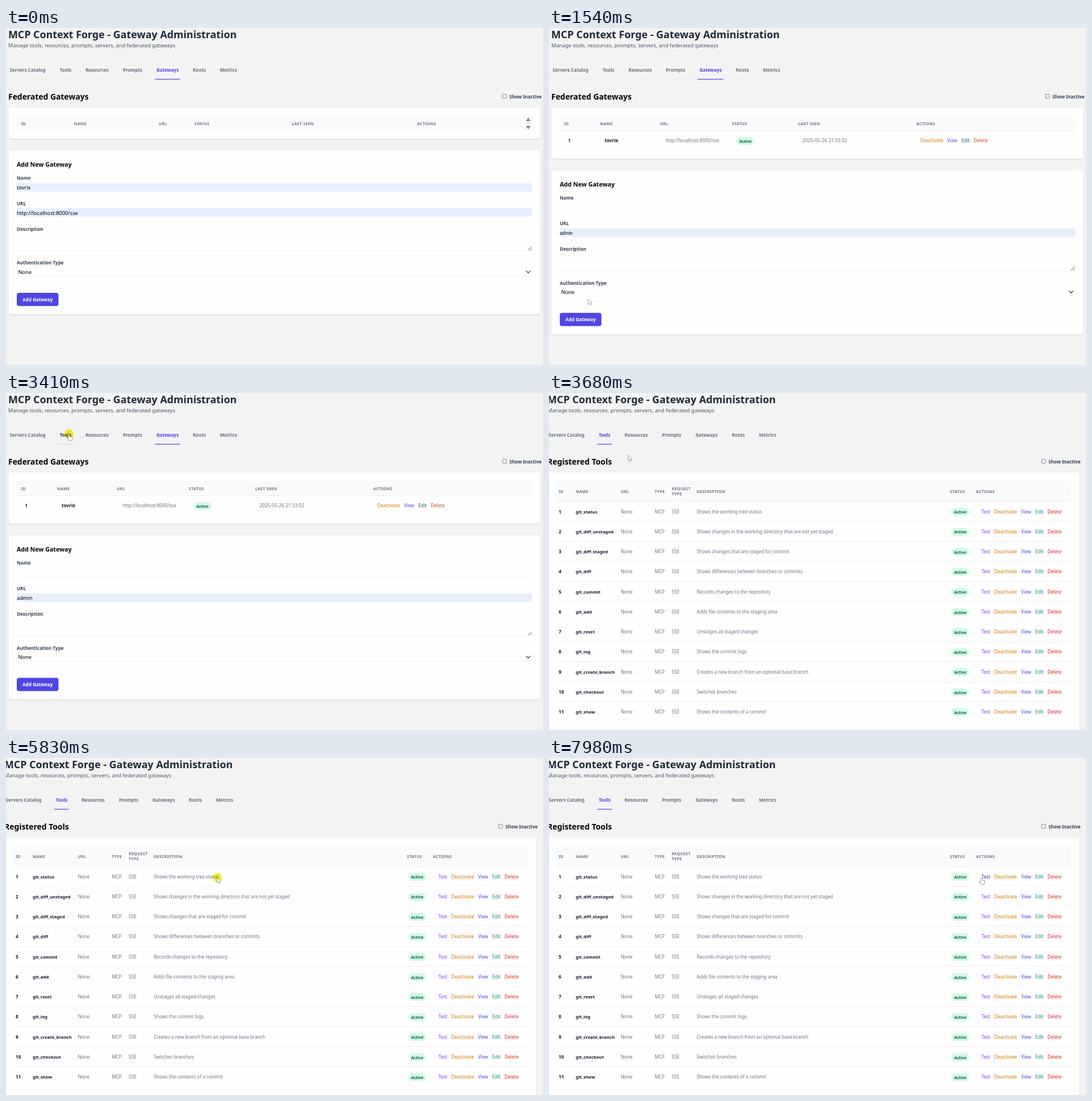
Animation of 945x593 px, one loop 8 s. Source, as an HTML page with a canvas:

```html
<!DOCTYPE html>
<html lang="en">
<head>
<meta charset="utf-8">
<title>Gateway Administration</title>
<style>
html, body { margin: 0; width: 100%; height: 100%; overflow: hidden; background: #f3f3f4; }
canvas { display: block; width: 945px; height: 593px; }
</style>
</head>
<body>
<canvas id="c" width="945" height="593"></canvas>
<script>
const g = document.getElementById('c').getContext('2d');
const LOOP = 8000, PRESS = 880, RELOAD = 1150, TOOLS = 3500, ROW = 35.27;
const INDIGO = '#4f46e5', GRAY = '#6b7280', DARK = '#374151', INK = '#111827', LINE = '#ececef', FILL = '#e7effd';
const XS = 6.95, SM = 8.1, MD = 9.24, NAME = 7.76;

// Draws text and returns the x where it ends
function text(s, x, y, size, color, weight = 400, gap = 0, family = '"Noto Sans"') {
  g.font = `${weight} ${size}px ${family}, sans-serif`;
  g.letterSpacing = gap + 'px';
  g.fillStyle = color;
  g.fillText(s, x, y);
  return x + g.measureText(s).width;
}
function rect(x, y, w, h, color) {
  g.fillStyle = color;
  g.fillRect(x, y, w, h);
}
function round(x, y, w, h, r, color) {
  g.fillStyle = color;
  g.beginPath();
  g.roundRect(x, y, w, h, r);
  g.fill();
}
function stroke(points, color, width) {
  g.strokeStyle = color;
  g.lineWidth = width;
  g.beginPath();
  points.forEach(([x, y]) => g.lineTo(x, y));
  g.stroke();
}
function shape(points) {
  stroke([...points, points[0]], '#444', 1);
  g.fillStyle = '#fff';
  g.fill();
}
function card(y, h) {
  g.save();
  g.shadowColor = 'rgba(0,0,0,.16)';
  g.shadowBlur = 2;
  g.shadowOffsetY = 0.8;
  round(4.5, y, 936, h, 5, '#fefefe');
  g.restore();
}
const head = (s, x, y) => text(s, x, y, XS, GRAY, 600, 0.33);
const label = (s, y) => text(s, 19, y, SM, DARK, 600);
const rule = y => rect(19, y, 907, 0.8, LINE);
const field = y => round(19, y, 907, 15, 3, FILL);

function badge(x, y) {
  round(x, y, 31, 13.5, 6.7, '#d1fae5');
  text('Active', x + 5, y + 9.8, XS, '#065f46', 600);
}
function actions(x, y, colors) {
  for (const [name, color] of Object.entries(colors)) x = text(name, x, y, SM, color) + 7.2;
}

function header(tab, title, hover) {
  text('MCP Context Forge - Gateway Administration', 4, 18.4, 17.87, '#1f2937', 700);
  text('Manage tools, resources, prompts, servers, and federated gateways', 4, 33.6, MD, '#4b5563');
  rect(4, 90, 937, 0.8, LINE);
  let x = 6.5;
  for (const name of ['Servers Catalog', 'Tools', 'Resources', 'Prompts', 'Gateways', 'Roots', 'Metrics']) {
    const on = name === tab, over = name === hover;
    const end = text(name, x, 76.8, SM, on ? INDIGO : over ? DARK : GRAY, 600);
    if (on || over) rect(x - 2.5, 89.6, end - x + 5, 1.2, on ? INDIGO : '#d1d5db');
    x = end + 24.8;
  }
  text(title, 4, 126.2, 13.9, '#000', 700);
  g.strokeStyle = '#767676';
  g.lineWidth = 0.9;
  g.beginPath();
  g.roundRect(873.8, 116.6, 7, 7, 1.2);
  g.stroke();
  text('Show Inactive', 886, 123.6, SM, DARK, 600);
}

function gateways(t) {
  const added = t >= RELOAD, dy = added ? ROW : 0;
  header('Gateways', 'Federated Gateways', overTab(t) && 'Tools');
  card(140, 55 + dy);
  rect(19, 154.5, 907, 26, '#f9fafb');
  const xs = added ? [26.5, 90, 195, 322, 438.5, 646.5] : [26.5, 119.5, 269, 331.5, 503, 723.5];
  ['ID', 'NAME', 'URL', 'STATUS', 'LAST SEEN', 'ACTIONS'].forEach((s, i) => head(s, xs[i], 170.5));
  if (added) {
    const y = 201.2;
    rule(180.3);
    text('1', 33.5, y, SM, INK, 600);
    text('tovrix', 98, y, SM, INK, 600);
    text('http://localhost:8000/sse', 205, y, SM, GRAY);
    badge(330, 192.3);
    text('2025-05-26 21:33:02', 446, y, SM, GRAY, 400, 0.13);
    actions(653.5, y, { Deactivate: '#d97706', View: INDIGO, Edit: '#155e75', Delete: '#cf4a1e' });
  } else {
    g.fillStyle = '#85858c';
    for (const side of [-1, 1]) {
      const y = 168 + side * 4.2;
      g.beginPath();
      g.moveTo(914.8, y);
      g.lineTo(923.2, y);
      g.lineTo(919, y + side * 6);
      g.fill();
    }
    rect(915, 167.3, 8, 0.9, '#c4c4ca');
  }
  g.save();
  g.translate(0, dy);
  form(t, added);
  g.restore();
}

function form(t, added) {
  card(215, 289);
  text('Add New Gateway', 19, 243.7, 10.65, '#000', 700);
  label('Name', 267.2);
  label('URL', 311.8);
  label('Description', 356.8);
  label('Authentication Type', 416.3);
  field(317.3);
  if (added) {
    rule(287.3);
    // The suggested value takes the page font after the first click
    if (t < 3340) text('admin', 19, 328.6, 8.3, '#000', 400, 0, '"Liberation Sans"');
    else text('admin', 19, 328.6, MD, '#000');
  } else {
    field(272.8);
    text('tovrix', 19, 284, MD, '#000');
    text('http://localhost:8000/sse', 19, 328.6, MD, '#000');
  }
  rule(392);
  for (const d of [6.5, 3]) stroke([[925 - d, 391], [925, 391 - d]], '#444', 0.9);
  text('None', 21.5, 433, MD, '#000');
  stroke([[915.3, 427.3], [919, 431], [922.7, 427.3]], '#222', 1.2);
  rule(436);
  if (!added && t >= PRESS) {
    round(17, 464, 77.5, 27.2, 5.5, INDIGO);
    round(18.1, 465.1, 75.3, 25, 4.5, '#fff');
  }
  round(19, 466, 73.3, 23.2, 4, !added && t > 500 ? '#4338ca' : INDIGO);
  text('Add Gateway', 29, 480.8, SM, '#fff', 600);
}

const tools = {
  git_status: 'Shows the working tree status',
  git_diff_unstaged: 'Shows changes in the working directory that are not yet staged',
  git_diff_staged: 'Shows changes that are staged for commit',
  git_diff: 'Shows differences between branches or commits',
  git_commit: 'Records changes to the repository',
  git_add: 'Adds file contents to the staging area',
  git_reset: 'Unstages all staged changes',
  git_log: 'Shows the commit logs',
  git_create_branch: 'Creates a new branch from an optional base branch',
  git_checkout: 'Switches branches',
  git_show: 'Shows the contents of a commit'
};

function toolList(t) {
  g.save();
  g.translate(-7, 0);
  header('Tools', 'Registered Tools');
  card(140, 470);
  rect(19, 154.5, 907, 36, '#f9fafb');
  for (let i = 0; i < 11; i++) rule(190 + i * ROW);
  g.restore();

  const cols = { ID: 17, NAME: 47, URL: 126.4, TYPE: 186, DESCRIPTION: 260, STATUS: 705.5, ACTIONS: 751.5 };
  for (const [s, x] of Object.entries(cols)) head(s, x, 175.6);
  head('REQUEST', 216, 170.6);
  head('TYPE', 216, 180.4);
  Object.entries(tools).forEach(([name, info], i) => {
    const y = 211.6 + i * ROW;
    text(i + 1, cols.ID, y, SM, INK, 600);
    text(name, cols.NAME, y, NAME, INK, 600);
    text('None', cols.URL, y, SM, GRAY);
    text('MCP', cols.TYPE, y, SM, GRAY);
    text('SSE', 216, y, SM, GRAY);
    text(info, cols.DESCRIPTION, y, SM, GRAY);
    badge(708, y - 9.2);
    const test = i === 0 && overTest(t) ? '#4c1d95' : '#7c3aed';
    actions(761, y, { Test: test, Deactivate: '#d97706', View: INDIGO, Edit: '#0d8a72', Delete: '#dc2626' });
  });
  if (t >= 4370 && t < 5200) select(cols.NAME, Math.min(t, 4860), 'git_status', NAME, 600);
  if (t >= 5200 && t < 5800) select(cols.DESCRIPTION, Math.min(t, 5700), tools.git_status, SM, 400);
}

// The selection trails the pointer by 100 ms
function select(x, t, s, size, weight) {
  const w = place(t - 100).x - x;
  if (w <= 0) return;
  g.font = `${weight} ${size}px "Noto Sans", sans-serif`;
  g.letterSpacing = '0px';
  const shown = Math.min(w, g.measureText(s).width);
  g.save();
  g.beginPath();
  g.rect(x, 202, shown, 12.8);
  g.clip();
  rect(x, 202, shown, 12.8, '#3565cf');
  text(s, x, 211.6, size, '#fff', weight);
  g.restore();
}

// Pointer moves: start, end, x, y reached; it rests in between
const moves = [
  [70, 540, 69, 477], [1540, 2290, 690.5, 187], [2340, 3270, 111, 72],
  [3560, 3950, 236, 236], [3950, 4240, 47, 211], [4370, 4620, 87, 213],
  [4860, 5130, 260, 211], [5200, 5560, 394, 211], [5700, 5790, 372, 210.5],
  [5880, 6040, 238, 210], [6300, 6580, 598, 209], [6580, 7070, 112, 113],
  [7070, 7200, 73, 108], [7200, 7940, 761, 211]
];
function place(t) {
  let x = 822, y = 588;
  for (const [start, end, toX, toY] of moves) {
    const u = Math.min(1, Math.max(0, (t - start) / (end - start)));
    const e = u * u * (3 - 2 * u);
    x += (toX - x) * e;
    y += (toY - y) * e;
  }
  return { x, y };
}
function overTab(t) {
  const p = place(t);
  return p.x < 122 && p.y < 85;
}
const overTest = t => t > TOOLS && place(t).x > 757;
const pressed = t => [[PRESS, 130], [3330, 150], [4370, 370], [5150, 450], [5780, 110]]
  .some(([start, span]) => t >= start && t < start + span);

function pointer(t) {
  if (t < 70) return;
  const { x, y } = place(t);
  g.save();
  g.translate(x, y);
  g.lineJoin = 'round';
  if (pressed(t)) {
    g.globalCompositeOperation = 'multiply';
    round(-8, -8, 16, 16, 8, '#fbee3a');
    g.globalCompositeOperation = 'source-over';
  }
  if (overTab(t) || overTest(t)) hand();
  else if (t > 4180 && t < 5720) beam();
  else arrow();
  g.restore();
}
function arrow() {
  shape([[0, 0], [0, 9.2], [2.1, 7.3], [3.6, 10.4], [5, 9.7], [3.6, 6.7], [6.4, 6.5]]);
}
function beam() {
  for (const y of [-5, 5]) stroke([[-2.3, y], [2.3, y]], '#555', 1);
  stroke([[0, -5], [0, 5]], '#555', 1);
}
function hand() {
  shape([[-0.9, 0.5], [0.9, 0.5], [1, 4], [5.5, 5.4], [5.4, 8.4], [4.3, 11.6], [-0.6, 11.6], [-3.6, 6.6], [-0.9, 7.4]]);
}

function draw(now) {
  const t = now % LOOP;
  rect(0, 0, 945, 593, '#f3f3f4');
  if (t < TOOLS) gateways(t);
  else toolList(t);
  pointer(t);
  requestAnimationFrame(draw);
}
requestAnimationFrame(draw);
</script>
</body>
</html>
```
